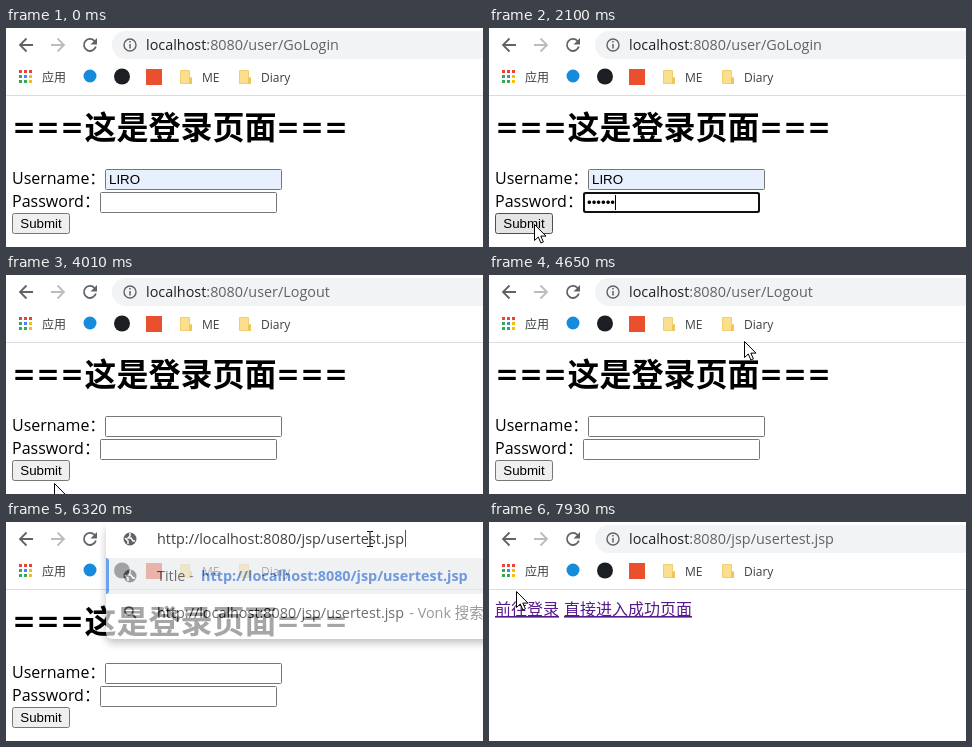
Animation, 477 px wide and 219 px high, one loop 8000 ms. Source, as an HTML page:

```html
<!DOCTYPE html>
<html lang="zh-CN">
<head>
<meta charset="utf-8">
<title>Login</title>
<style>
html, body { margin: 0; width: 100%; height: 100%; overflow: hidden; background: #fff; }
svg { display: block; width: 477px; height: 219px; }
text { font: 16px "Open Sans", "Noto Sans CJK SC", "Noto Sans CJK", sans-serif; white-space: pre; }
.url, .url text { font-size: 14.4px; fill: #5f6368; }
.url .host { fill: #202124; }
.url .entry { fill: #3c4043; }
.mark { font-size: 12px; fill: #3c4043; }
.title { font-size: 32px; font-weight: 700; }
.eq { font-size: 37px; font-weight: 600; }
.form { font: 13.333px "Liberation Sans", Arial, sans-serif; }
.link { fill: #551a8b; text-decoration: underline; }
.box { fill: #fff; stroke: #767676; }
.icon { fill: none; stroke: #5f6368; stroke-width: 1.8; }
</style>
</head>
<body>
<svg viewBox="0 0 477 219">
  <defs>
    <filter id="blur" x="-10%" y="-20%" width="120%" height="140%"><feGaussianBlur stdDeviation="4"/></filter>
    <g id="folder"><path d="M.5.500H9.500V7.500H11.500V13.500H.5z" fill="#fbdf8f" stroke="#f0cf72"/><path d="M9 8h3v6H9z" fill="#efc65a"/></g>
    <g id="globe"><circle r="6.500" fill="#5f6368"/><path d="M-5-1l3 3v3M0-6v3l-2 2h3l2 3 2 0" fill="none" stroke="#fff" stroke-width="1.500"/></g>
  </defs>

  <g id="toolbar">
    <rect x="106" y="3" width="400" height="28" rx="14" fill="#f1f3f4"/>
    <path class="icon" d="M27 17H14M20.500 10.500L14 17l6.500 6.500"/>
    <path class="icon" d="M45 17h13M51.500 10.500L58 17l-6.500 6.500" style="stroke:#babcbe"/>
    <path class="icon" d="M88.500 13A6 6 0 1 0 89.800 18.500"/>
    <path d="M91 10v6.500h-6.500z" fill="#5f6368"/>
    <g id="apps"></g>
    <text class="mark" x="36" y="54">应用</text>
    <circle cx="84" cy="48" r="6.500" fill="#168bdc"/>
    <circle cx="116" cy="48.500" r="8" fill="#1b1f23"/>
    <rect x="140" y="41" width="16" height="16" fill="#e8502e"/>
    <use href="#folder" x="174" y="42"/><text class="mark" x="196" y="54">ME</text>
    <use href="#folder" x="233" y="42"/><text class="mark" x="255" y="54">Diary</text>
    <path d="M0 67.500H477" stroke="#dadce0"/>
  </g>

  <g id="heading">
    <text class="eq" x="7.500 31.500 55.500" y="113">===</text>
    <text class="title" id="title" x="78.500" y="111"></text>
    <text class="eq" x="271.500 295.500 319.500" y="113">===</text>
  </g>

  <g id="login">
    <text x="6" y="156">Username：</text>
    <rect class="box" id="user" x="99.500" y="141.500" width="176" height="20" rx="1"/>
    <text class="form" id="name" x="103" y="156">LIRO</text>
    <text x="6" y="179">Password：</text>
    <rect class="box" id="pass" x="94.500" y="164.500" width="176" height="20" rx="1"/>
    <rect id="ring" x="95" y="165" width="175" height="19" rx="2" fill="none" stroke="#101010" stroke-width="2"/>
    <text class="form" id="dots" x="98" y="179"></text>
    <rect id="passCaret" y="167" width="1" height="15"/>
    <rect id="submit" x="6.500" y="185.500" width="57" height="20" rx="2"/>
    <text class="form" x="35" y="200" text-anchor="middle">Submit</text>
  </g>

  <g id="success">
    <text x="6" y="156">当前登录的用户为：LIRO</text>
    <text class="link" x="6" y="214">退出登录</text>
  </g>

  <g id="links">
    <text class="link" x="6" y="93">前往登录</text>
    <text class="link" x="75" y="93">直接进入成功页面</text>
  </g>

  <g id="popup" class="url">
    <rect x="100" y="5" width="400" height="116" rx="6" fill="#000" opacity=".38" filter="url(#blur)"/>
    <rect x="100" y="-8" width="400" height="125" rx="6" fill="#fff"/>
    <rect x="100" y="36" width="400" height="36" fill="#e8eaed"/>
    <path d="M100 36q3 0 3 3v30q0 3-3 3z" fill="#1a73e8"/>
    <use href="#globe" x="124" y="54"/>
    <text x="151" y="59"><tspan class="host">Title</tspan> - <tspan x="195" fill="#2563cc" font-weight="700">http://localhost:8080/jsp/usertest.jsp</tspan></text>
    <path class="icon" d="M126 92l4 4M127 89a4 4 0 1 0-8 0a4 4 0 1 0 8 0"/>
    <text x="151" y="96"><tspan class="host">http://localhost:8080/jsp/usertest.jsp</tspan><tspan dx="1.500"> - Vonk 搜索</tspan></text>
  </g>

  <g id="idle" class="url">
    <rect id="focus" x="107" y="3" width="400" height="28" rx="14" fill="#fff" stroke="#1a73e8" stroke-width="2"/>
    <circle class="icon" cx="124" cy="17" r="6" style="stroke-width:1.400"/>
    <path class="icon" d="M124 16v4.500M124 13v1.600" style="stroke-width:1.500"/>
    <rect id="select" x="140" y="7" height="19" fill="#0078d7"/>
    <text id="url" x="140" y="22"><tspan class="host">localhost</tspan><tspan id="path"></tspan></text>
  </g>

  <g id="typed" class="url">
    <rect x="101" y="0" width="400" height="35" fill="#fff"/>
    <use href="#globe" x="124" y="17"/>
    <text x="151" y="22"><tspan class="entry">http://localhost:8080/jsp/usertest.jsp</tspan></text>
    <rect id="urlCaret" x="399" y="8" width="1" height="17" fill="#555"/>
  </g>

  <g id="cursor">
    <path id="arrow" d="M.5.5V16.500L4.300 13l2.600 6 2.500-1.100-2.600-5.800H12z" fill="#fff" stroke="#000"/>
    <path id="beam" d="M-3-7.500h2.500l.500.500.500-.500H3M0-7V7M-3 7.500h2.500L0 7l.500.500H3" fill="none" stroke="#000"/>
    <path id="hand" d="M-1.500 8V1.500Q-1.500 0 0 0T1.500 1.500V6l2 .3 2 .7 2 .8 2.500 1.200v5L8.500 19h-8L-4.500 12q-1-2 .5-2.500L-1.500 11z" fill="#fff" stroke="#000"/>
  </g>
</svg>
<script>
const LOOP = 8000, STEP = 70;
const $ = id => document.getElementById(id);
const show = (id, on) => { $(id).style.display = on ? '' : 'none'; };
const within = (t, a, b) => t >= a && t < b;

// Pointer keys: time, x, y
const KEYS = [
  [0, 345, 232], [70, 327, 207], [350, 186, 177], [500, 186, 177], [840, 184, 181],
  [1850, 184, 181], [2030, 58, 200], [2100, 45, 196], [2450, 45, 196], [2780, 198, 151],
  [2860, 198, 151], [3060, 78, 180], [3540, 48, 208], [4080, 48, 208], [4650, 255, 66],
  [4790, 300, 37], [5100, 364, 17], [7590, 364, 17], [7930, 27, 69], [LOOP, 27, 69]
];
// Page states: start time, kind, path
const PAGES = [
  [0, 'login', ':8080/user/GoLogin'],
  [2380, 'success', ':8080/user/Login?username=LIRO&password=123456'],
  [4010, 'login', ':8080/user/Logout'],
  [7130, 'links', ':8080/jsp/usertest.jsp']
];
const FADE = [[0, 0], [6320, .65], [6390, 1], [7060, .5], [7130, .08], [7200, 0]];

const latest = (table, t) => table.filter(row => row[0] <= t).pop();

function pointer(t) {
  const i = KEYS.findIndex(k => k[0] > t);
  const [t0, x0, y0] = KEYS[i - 1], [t1, x1, y1] = KEYS[i];
  const u = Math.floor((t - t0) / STEP) * STEP / (t1 - t0);
  return [x0 + (x1 - x0) * u, y0 + (y1 - y0) * u].map(Math.round);
}

function shape(x, y, page) {
  if (x > 106 && y < 31) return 'beam';
  if (page === 'login' && within(x, 94, 271) && within(y, 164, 186)) return 'beam';
  if (page === 'success' && x < 70 && y > 198) return 'hand';
  return 'arrow';
}

function draw(t) {
  const [, page, path] = latest(PAGES, t);
  const [x, y] = pointer(t);
  const kind = shape(x, y, page);

  for (const id of ['login', 'success', 'links']) show(id, id === page);
  show('heading', page !== 'links');
  $('title').textContent = page === 'success' ? '这是成功页面' : '这是登录页面';
  $('path').textContent = path;

  // Form
  const filled = t < 2380;
  show('name', filled);
  $('user').style.fill = filled ? '#e8f0fe' : '#fff';
  $('pass').style.stroke = kind === 'beam' && y > 100 ? '#4f4f4f' : '#767676';
  show('ring', within(t, 570, 2310));
  const count = filled ? Math.max(0, Math.min(6, Math.floor((t - 1500) / STEP) + 1)) : 0;
  $('dots').textContent = '•'.repeat(count);
  $('passCaret').setAttribute('x', Math.round(98 + count * 4.67));
  show('passCaret', within(t, 570, 1170) || within(t, 1500, 2310));
  const over = page === 'login' && x < 64 && within(y, 185, 206);
  $('submit').style.fill = over ? '#e5e5e5' : '#efefef';
  $('submit').style.stroke = over ? '#4f4f4f' : '#767676';

  // Address bar
  const chosen = within(t, 5170, 6320), typed = within(t, 6320, 7130);
  show('idle', !typed);
  show('typed', typed);
  show('focus', chosen);
  show('select', chosen);
  $('url').style.fill = chosen ? '#fff' : '';
  $('url').firstChild.style.fill = chosen ? '#fff' : '';
  if (chosen) $('select').setAttribute('width', $('url').getComputedTextLength());
  show('urlCaret', t < 6860);
  $('popup').style.opacity = latest(FADE, t)[1];

  for (const id of ['arrow', 'beam', 'hand']) show(id, id === kind);
  $('cursor').setAttribute('transform', `translate(${x} ${y})`);
}

const RED = '#ea4335', GREEN = '#34a853', BLUE = '#4285f4', YELLOW = '#fbbc04';
$('apps').innerHTML = [RED, RED, RED, GREEN, BLUE, YELLOW, GREEN, GREEN, YELLOW].map((c, i) =>
  `<rect x="${13 + i % 3 * 5}" y="${42 + Math.floor(i / 3) * 5}" width="3" height="3" fill="${c}"/>`).join('');

const start = performance.now();
function tick() {
  draw((performance.now() - start) % LOOP);
  requestAnimationFrame(tick);
}
tick();
</script>
</body>
</html>
```
